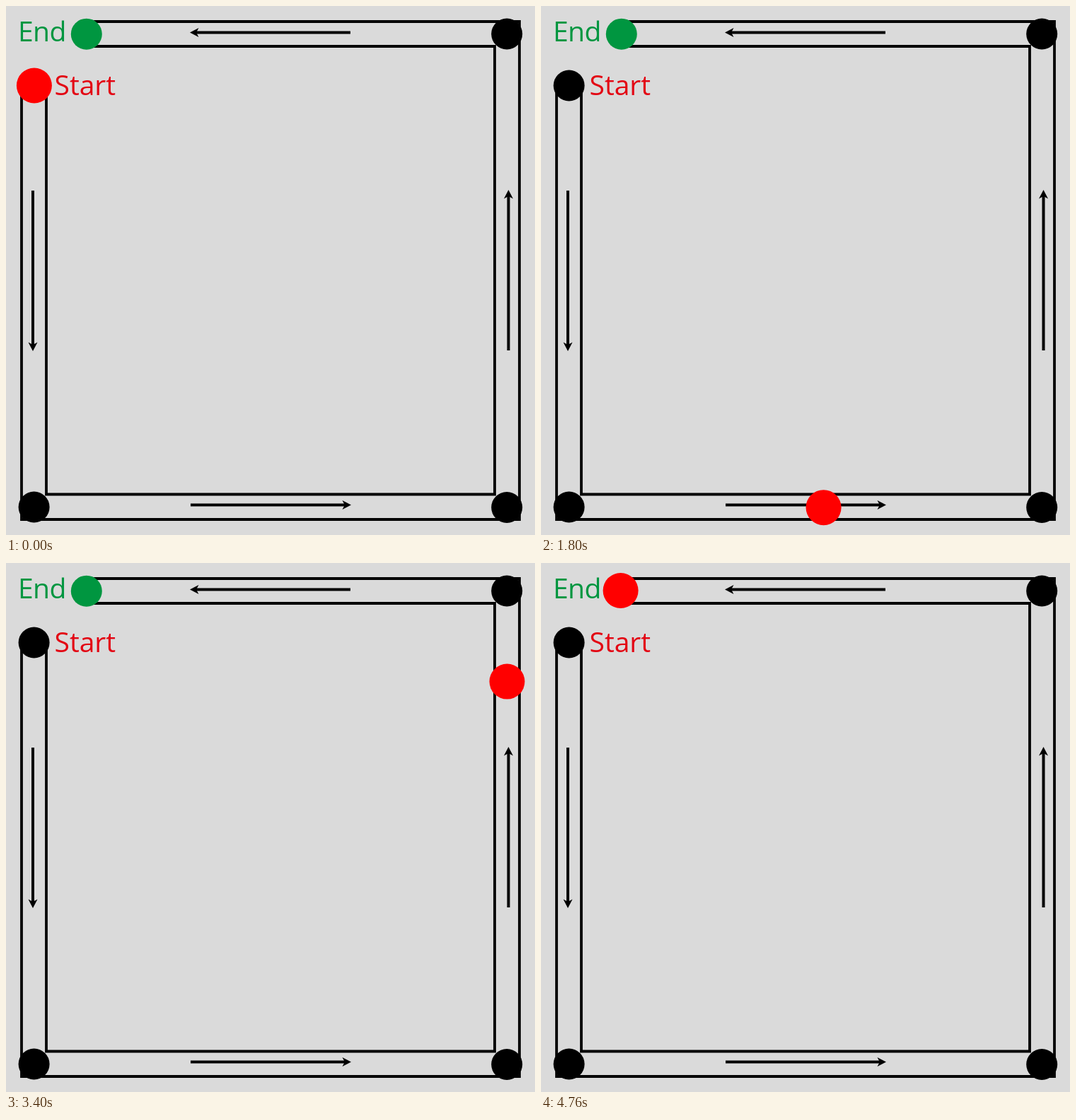
Recreate the animation shown at these times as an HTML page. Size 748x748 px, loop 4.8 s.

```html
<!DOCTYPE html>
<html lang="en">
<head>
<meta charset="utf-8">
<title>Path from start to end</title>
<style>
  html, body { margin: 0; width: 100%; height: 100%; overflow: hidden; background: #dadada; }
  svg { position: absolute; left: 0; top: 0; }
  text { font: 39px "Open Sans", "Noto Sans", sans-serif; }
  .track { fill: none; stroke: #000; stroke-width: 3.8; }
  .runner {
    position: absolute; left: 0; top: 0;
    width: 50px; height: 50px; border-radius: 50%;
    background: #f00;
    offset-path: path("M39.9 112.5 L39.2 709.3 L709 709 L708.4 40.2 L112.6 39");
    offset-rotate: 0deg;
    animation: run 4.8s steps(120, jump-none) infinite;
  }
  @keyframes run {
    from { offset-distance: 0%; }
    to { offset-distance: 100%; }
  }
</style>
</head>
<body>
<svg width="748" height="748" viewBox="0 0 748 748">
  <defs>
    <!-- Points right, tip at the origin -->
    <g id="arrow">
      <path d="M-227 0H-6" stroke="#000" stroke-width="4"/>
      <path d="M0 0L-12.5 6.5L-9 0L-12.5 -6.5Z"/>
    </g>
  </defs>

  <g class="track">
    <path d="M22 112V726H726V22H113"/>
    <path d="M57 112V690.5H691V57H113"/>
  </g>

  <use href="#arrow" transform="translate(38 488) rotate(90)"/>
  <use href="#arrow" transform="translate(488 705.5)"/>
  <use href="#arrow" transform="translate(710.5 260) rotate(-90)"/>
  <use href="#arrow" transform="translate(260 37.5) rotate(180)"/>

  <circle cx="39.6" cy="112.5" r="22"/>
  <circle cx="39.6" cy="708.5" r="22"/>
  <circle cx="708.2" cy="709" r="22"/>
  <circle cx="708.2" cy="39.5" r="22"/>
  <circle cx="113.8" cy="39.7" r="22" fill="#009640"/>

  <text x="17" y="50" fill="#009640" letter-spacing="-0.6">End</text>
  <text x="68.5" y="125.5" fill="#e30613">Start</text>
</svg>
<div class="runner"></div>
</body>
</html>
```
